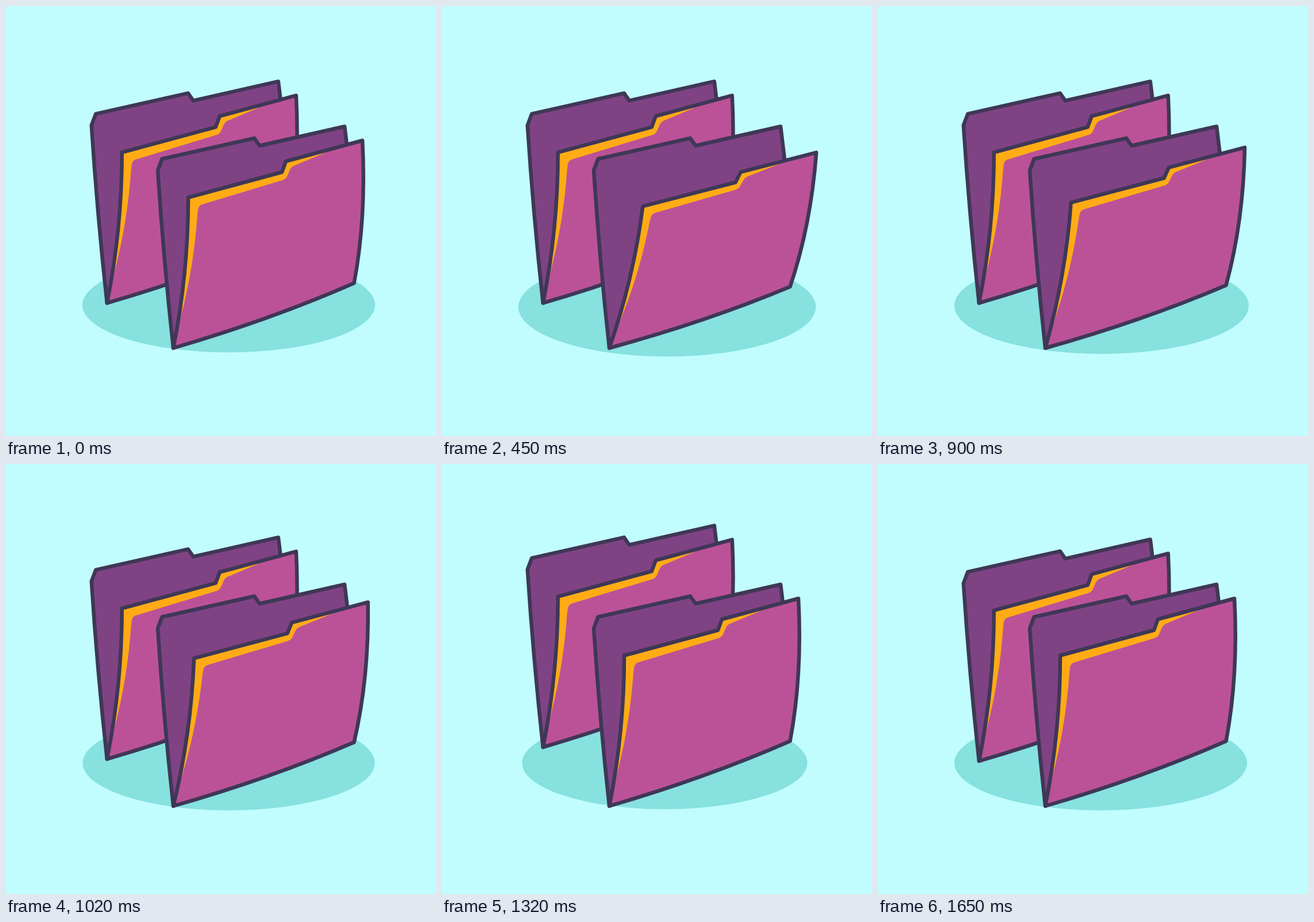
Animation, 748 px wide and 748 px high, one loop 1.8 s. Source, as an HTML page with a canvas:

```html
<!DOCTYPE html>
<html lang="en">
<head>
<meta charset="utf-8">
<title>Folders</title>
<style>
  html, body { margin: 0; width: 100%; height: 100%; overflow: hidden; background: #c1fdff; }
  canvas { display: block; width: 100vmin; height: 100vmin; }
</style>
</head>
<body>
<canvas id="stage" width="748" height="748"></canvas>
<script>
const ctx = document.getElementById('stage').getContext('2d');
const LOOP = 1800, STEP = 30, LAST = 1650;
const COLOR = {
  bg: '#c1fdff', shadow: '#86e1df', back: '#7f4384',
  front: '#bb5298', edge: '#ffab16', line: '#3f3756'
};

// Rises from 0 to 1 and falls back at constant speed.
function wave(t, start, end, peak = (start + end) / 2) {
  const part = t < peak ? (t - start) / (peak - start) : (end - t) / (end - peak);
  return Math.max(0, part);
}

const opening = t => 1.16 * wave(t, 0, 1160);
const hop = t => 31.4 * wave(t, 990, 1526) + 7.2 * wave(t, 1526, 1650);
const growth = t => 10.6 * wave(t, 0, 1025, 580);
const shrink = t => 6.5 * wave(t, 990, 1650);

const pt = (x, y) => ({ x, y });
const shift = (p, dx, dy) => pt(p.x + dx, p.y + dy);
const mix = (a, b, u) => pt(a.x + (b.x - a.x) * u, a.y + (b.y - a.y) * u);
const lineTo = p => ctx.lineTo(p.x, p.y);
const curveTo = (c, p) => ctx.quadraticCurveTo(c.x, c.y, p.x, p.y);
const roundTo = (corner, next, r) => ctx.arcTo(corner.x, corner.y, next.x, next.y, r);

// Corners of a closed flap; the tab rises from step to tab.
const foot = pt(291, 595), heel = pt(605.5, 482);
const left = pt(317, 333), step = pt(480, 289), tab = pt(487, 270), right = pt(620, 234);

// Tilts a point of the flap around its bottom edge.
function tilt(p, k) {
  const along = (p.x - foot.x) / (heel.x - foot.x);
  const up = Math.max(0, (mix(foot, heel, along).y - p.y) / 250);
  return shift(p, 35.5 * k * up ** 0.9, k * (7 * along + 16.3 * up));
}

function shape(color, outlined, trace) {
  ctx.beginPath();
  trace();
  ctx.closePath();
  ctx.fillStyle = color;
  ctx.fill();
  if (outlined) ctx.stroke();
}

function panel() {
  const side = pt(264, 286), tail = pt(432, 230), top = pt(589, 209.5);
  lineTo(foot);
  curveTo(pt(274, 440), side);
  lineTo(shift(side, 7.5, -20));
  lineTo(tail);
  lineTo(shift(tail, 9, 13));
  lineTo(top);
  lineTo(shift(top, 8, 66));
  lineTo(shift(heel, -5, -12));
}

function flap(k) {
  const at = p => tilt(p, k);
  const sideAndBottom = () => {
    lineTo(at(right));
    curveTo(at(pt(627, 368)), at(heel));
    curveTo(at(pt(462, 545)), at(foot));
  };
  const outline = () => {
    lineTo(at(foot));
    curveTo(at(pt(317, 466)), at(left));
    [step, tab].forEach(p => lineTo(at(p)));
    sideAndBottom();
  };
  const corner = at(shift(left, 18, 14));
  const low = at(shift(step, 7, 12)), high = at(shift(tab, 9, 10));
  const end = at(mix(tab, right, 0.69));

  shape(COLOR.edge, false, outline);
  shape(COLOR.front, false, () => {
    lineTo(at(pt(306, 533)));
    curveTo(at(pt(327, 450)), at(shift(left, 16, 29)));
    roundTo(corner, low, 11);
    roundTo(low, high, 14);
    roundTo(high, end, 14);
    lineTo(end);
    sideAndBottom();
  });
  ctx.beginPath();
  outline();
  ctx.closePath();
  ctx.stroke();
}

function folder(dx, dy, k) {
  ctx.save();
  ctx.translate(dx, dy);
  shape(COLOR.back, true, panel);
  flap(k);
  ctx.restore();
}

function shadow(t) {
  const g = growth(t) / 2, s = shrink(t);
  shape(COLOR.shadow, false, () => ctx.ellipse(
    387.4 + g, 520 + 0.88 * g, 254.6 + g - s, 82.6 + 0.88 * g - s / 3, 0, 0, Math.PI * 2
  ));
}

function draw(now) {
  const t = Math.min(LAST, Math.floor((now % LOOP) / STEP) * STEP);
  ctx.fillStyle = COLOR.bg;
  ctx.fillRect(0, 0, 748, 748);
  ctx.strokeStyle = COLOR.line;
  ctx.lineWidth = 6.5;
  ctx.lineJoin = 'round';
  shadow(t);
  folder(-115.3, -78.3 - hop(t), 0);
  folder(0, 0, opening(t));
}

const start = performance.now();
function tick() {
  draw(performance.now() - start);
  requestAnimationFrame(tick);
}
tick();
</script>
</body>
</html>
```
